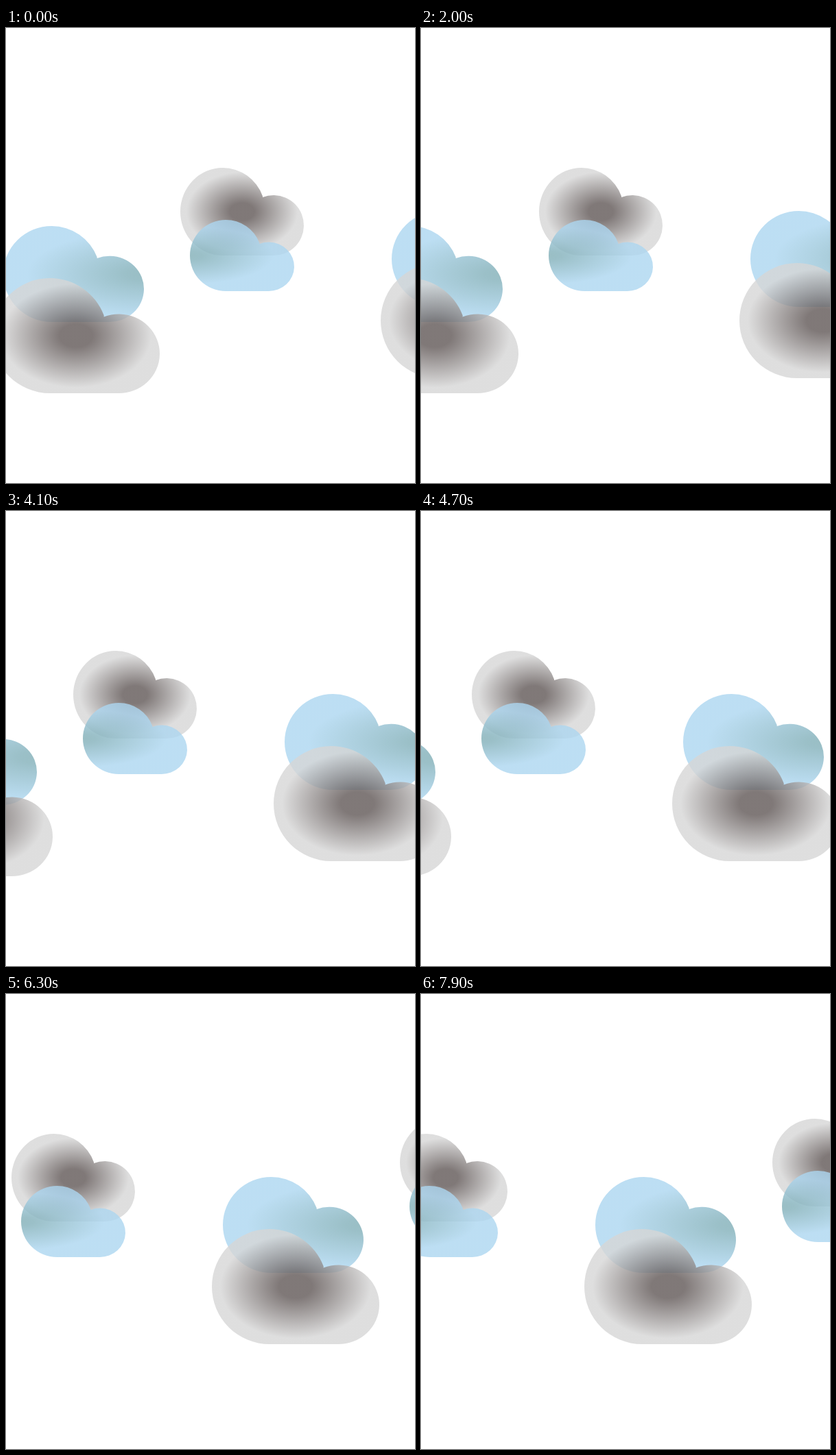
Write an HTML page with a canvas that moves like this. It is 596x664 px and loops after 8000 ms.

```html
<!DOCTYPE html>
<html lang="en">
<head>
<meta charset="utf-8">
<title>Drifting clouds</title>
<style>
  html, body { margin: 0; width: 100%; height: 100%; overflow: hidden; background: #fff; }
  canvas { display: block; }
</style>
</head>
<body>
<canvas width="596" height="664"></canvas>
<script>
const canvas = document.querySelector('canvas');
const ctx = canvas.getContext('2d');
const LOOP = 8000;

// Gradients live on a unit circle that is stretched over each cloud.
function radial(...stops) {
  const gradient = ctx.createRadialGradient(0, 0, 0, 0, 0, 1);
  for (const [at, color] of stops) gradient.addColorStop(at, color);
  return gradient;
}
const grey = radial([0, 'rgb(96,87,86)'], [0.2, 'rgb(96,87,86)'], [0.9, 'rgb(214,214,214)']);
const blue = radial([0, 'rgb(128,174,182)'], [0.15, 'rgb(130,176,186)'], [1, 'rgb(172,214,240)']);

// The outline is designed in a 180 x 128 box.
function cloud(x, y, w, h, fill, cx, rx, ry) {
  ctx.setTransform(w / 180, 0, 0, h / 128, x, y);
  ctx.beginPath();
  ctx.ellipse(62, 64, 62, 64, 0, Math.PI / 2, 2 * Math.PI - 0.361);
  ctx.arc(136, 84, 44, -1.943, Math.PI / 2);
  ctx.closePath();
  ctx.setTransform(w * rx, 0, 0, h * ry, x + w * cx, y + h / 2);
  ctx.fillStyle = fill;
  ctx.fill();
}

function largePair(x, y) {
  cloud(x + 16, y, 205, 140, blue, 1, 0.83, 0.45);
  cloud(x, y + 76, 244, 168, grey, 0.5, 0.5, 0.5);
}

function smallPair(x, y) {
  cloud(x, y, 180, 128, grey, 0.5, 0.5, 0.5);
  cloud(x + 14, y + 76, 152, 104, blue, 0, 0.8, 0.4);
}

// Pixels drifted after a number of steps; the pace is slightly uneven.
const drift = [[0, 0], [4, 38], [10, 82], [19, 156], [26, 214], [34, 276], [38, 308]];
function driftAt(step) {
  const i = Math.max(1, drift.findIndex(([s]) => s >= step));
  const [s0, d0] = drift[i - 1], [s1, d1] = drift[i];
  return 2 * Math.round((d0 + (d1 - d0) * (step - s0) / (s1 - s0)) / 2);
}

// One step every 200 ms, with a longer rest before 3700 ms.
function stepAt(t) {
  return t < 3700 ? Math.min(16, Math.floor(t / 200)) : 17 + Math.floor((t - 3700) / 200);
}

function draw(t) {
  const dx = driftAt(stepAt(t));
  ctx.setTransform(1, 0, 0, 1, 0, 0);
  ctx.globalAlpha = 1;
  ctx.fillStyle = '#fff';
  ctx.fillRect(0, 0, canvas.width, canvas.height);
  ctx.globalAlpha = 0.8;
  largePair(-20 - dx, 289);
  smallPair(254 - dx, 204);
  largePair(546 - dx, 267);
  smallPair(820 - dx, 182);
}

const start = performance.now();
function frame() {
  draw((performance.now() - start) % LOOP);
  requestAnimationFrame(frame);
}
frame();
</script>
</body>
</html>
```
